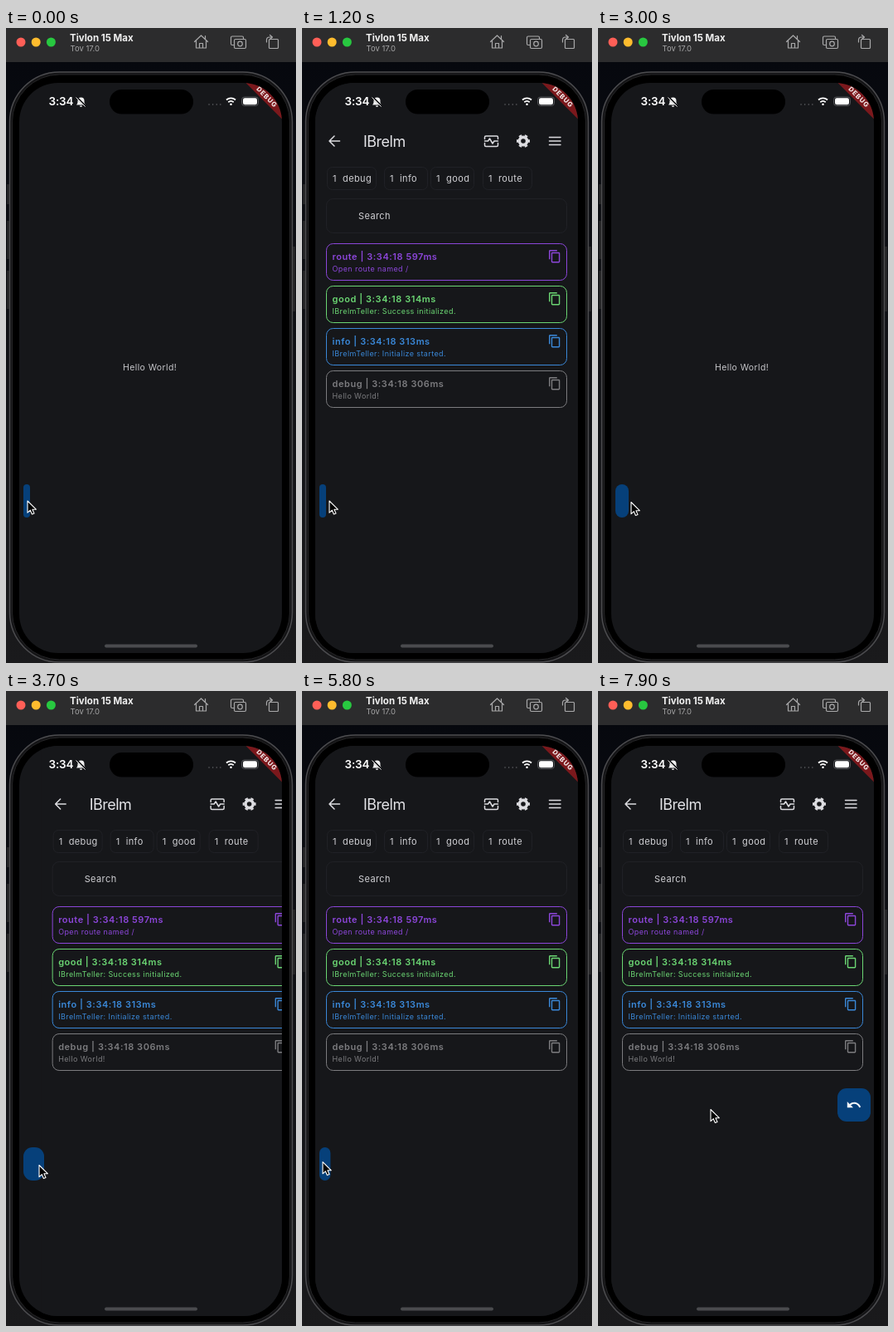
Animation of 350 by 764 pixels, one loop 8 s. Source, as an HTML page:

```html
<!DOCTYPE html>
<html lang="en">
<head>
<meta charset="utf-8">
<title>Log viewer demo</title>
<style>
  html, body { margin: 0; width: 100%; height: 100%; overflow: hidden; background: #08090c; }
  svg { display: block; width: 350px; height: 764px; font-family: Inter, "Open Sans", sans-serif; }
  text { white-space: pre; }
  .line { fill: none; stroke-linecap: round; stroke-linejoin: round; }
  .body { font-size: 11px; letter-spacing: .4px; fill: #d0d0d4; }
  .head { font-size: 11px; font-weight: 600; letter-spacing: .55px; }
  .sub { font-size: 9px; letter-spacing: .4px; }
  .faint { fill: none; stroke: #202126; }
</style>
</head>
<body>
<svg viewBox="0 0 350 764">
  <defs>
    <clipPath id="screen"><rect x="16" y="66" width="317" height="686" rx="47"/></clipPath>
    <linearGradient id="desk" x2="0" y2="1"><stop stop-color="#05070d"/><stop offset="1" stop-color="#1a1a1c"/></linearGradient>
    <path id="copy" transform="translate(296.6 6.8) scale(.7)" d="M16 1H4c-1.1 0-2 .9-2 2v14h2V3h12V1zm3 4H8c-1.1 0-2 .9-2 2v14c0 1.1.9 2 2 2h11c1.1 0 2-.9 2-2V7c0-1.1-.9-2-2-2zm0 16H8V7h11v14z"/>
  </defs>

  <!-- window bar -->
  <rect width="350" height="764" fill="url(#desk)"/>
  <rect width="350" height="41" fill="#2c2c2d"/>
  <g id="lights"></g>
  <text x="77" y="15.5" font-size="11.5" font-weight="700" fill="#f2f2f2">Tivlon 15 Max</text>
  <text x="77.5" y="28" font-size="9.5" fill="#a5a5a6">Tov 17.0</text>
  <g class="line" stroke="#a9a9aa" stroke-width="1.2">
    <path d="M227.5 16.5 235.5 9l8 7.500M229.5 15.5v8.5h12v-8.5M233.5 24v-5.5h4V24M240.5 13V9.5"/>
    <path d="M274.5 20.5H273a1.5 1.5 0 0 1-1.5-1.5v-7.5A1.5 1.5 0 0 1 273 10h12a1.5 1.5 0 0 1 1.5 1.5v1"/>
    <rect x="275.5" y="13.5" width="14" height="11" rx="1.5"/>
    <circle cx="282.5" cy="19" r="2.8"/>
    <rect x="317.5" y="13.5" width="11" height="11" rx="1"/>
    <path d="M314.5 17v-2.500a3.500 3.500 0 0 1 3.500-3.500h3M318.500 8.500l3 2.500-3 2.500"/>
  </g>

  <!-- device body -->
  <path d="M3 188v24M3 232v46M3 292v46M347 263v78" stroke="#242426" stroke-width="4"/>
  <rect x="4.5" y="53" width="341" height="710" rx="60" fill="#141416" stroke="#4c4c4f" stroke-width="1.5"/>
  <rect x="7.5" y="56" width="335" height="704" rx="57" fill="#000" stroke="#252527"/>

  <g clip-path="url(#screen)">
    <rect x="16" y="66" width="317" height="686" fill="#16171a"/>
    <text id="home" x="141" y="412" font-size="10.5" letter-spacing=".4" fill="#c6c6ca">Hello World!</text>

    <g id="page">
      <rect x="16" y="66" width="317" height="686" fill="#16171a"/>
      <g class="line" stroke="#dcdce0" stroke-width="1.5">
        <path d="M45.5 136H33.5M39 130l-6 6 6 6"/>
        <path d="M298.5 131.5h13.500M298.5 136h13.500M298.5 140.500h13.500"/>
        <path d="M220.5 133.5v-2a1.5 1.5 0 0 1 1.5-1.5h13a1.5 1.5 0 0 1 1.5 1.5v2M220.5 138.500v2.500A1.500 1.500 0 0 0 222 142.500h13a1.500 1.500 0 0 0 1.500-1.500v-2.500M220.500 136h4l2-3 3.500 6 2-3h4.500"/>
      </g>
      <g fill="none" stroke="#dcdce0">
        <circle cx="267" cy="136" r="4.6" stroke-width="3.6"/>
        <circle cx="267" cy="136" r="7" stroke-width="2" pathLength="12" stroke-dasharray="1 1" stroke-dashoffset=".5"/>
      </g>
      <text x="74" y="143" font-size="18" letter-spacing="-.5" fill="#e4e4e8">IBrelm</text>
      <g id="chips" class="body"></g>
      <rect class="faint" x="29.5" y="205.5" width="290" height="41" rx="8"/>
      <text class="body" x="68" y="229.5">Search</text>
      <g id="cards"></g>
    </g>

    <g id="button">
      <rect id="pill" x="21" y="549" height="40" fill="#06407a"/>
      <path id="undo" fill="#f4f6fa" transform="translate(31.2 559.4) scale(.8)" d="M12.5 8c-2.65 0-5.05.99-6.9 2.6L2 7v9h9l-3.62-3.62c1.39-1.16 3.16-1.88 5.12-1.88 3.54 0 6.55 2.31 7.6 5.5l2.37-.78C21.08 11.03 17.15 8 12.5 8z"/>
    </g>

    <!-- system overlay -->
    <g transform="translate(315 83) rotate(45)">
      <rect x="-40" y="-6" width="80" height="12" fill="#7b181c"/>
      <text y="2.9" font-size="8" font-weight="800" letter-spacing=".8" text-anchor="middle" fill="#f0e4e4">DEBUG</text>
    </g>
    <rect x="119" y="741.5" width="112" height="4" rx="2" fill="#4a4b4e"/>
  </g>
  <rect x="125" y="74" width="101" height="29.5" rx="14.7"/>
  <text x="51.5" y="93" font-size="13.5" font-weight="600" letter-spacing="-.2" fill="#fff">3:34</text>
  <path fill="#f0f0f0" d="M85 92.5c1.5-1.5 1.5-3 1.5-5a4 4 0 0 1 8 0c0 2 0 3.5 1.5 5zM89 93.5h3a1.5 1.5 0 0 1-3 0z"/>
  <path class="line" d="M85.5 83.5l10.5 10.5" stroke="#16171a" stroke-width="2.4"/>
  <path class="line" d="M84.8 83.8l10.5 10.5" stroke="#f0f0f0"/>
  <path class="line" d="M245 92h16" stroke="#66676b" stroke-width="1.4" stroke-dasharray=".1 4.5"/>
  <g class="line" stroke="#fff" stroke-width="1.9">
    <path d="M266 86.5a8.2 8.2 0 0 1 11 0M268.3 89.2a5 5 0 0 1 6.4 0" stroke-linecap="butt"/>
    <path d="M271.5 91.8v.1" stroke-width="2.4"/>
  </g>
  <rect x="284.5" y="83" width="20" height="10.5" rx="3.3" fill="none" stroke="#55565a"/>
  <rect x="286" y="84.3" width="17" height="8" rx="2.2" fill="#fff"/>

  <path id="cursor" d="M0 0V14.2L3.3 11.2 5.4 16 8 14.9 5.9 10.2H10.3Z" fill="#000" stroke="#fff" stroke-width="1.1" stroke-linejoin="round"/>
</svg>

<script>
const $ = id => document.getElementById(id);
const fill = (id, items, markup) => $(id).innerHTML = items.map(markup).join("");

fill("lights", ["#ff5f57", "#febc2e", "#28c840"], (color, i) =>
  `<circle cx="${18 + i * 18.2}" cy="17" r="5.5" fill="${color}"/>`);

fill("chips", [["debug", 37], ["info", 106], ["good", 162], ["route", 225]], ([name, x]) =>
  `<rect class="faint" x="${x - 6.5}" y="167.5" width="${24 + name.length * 7}" height="27" rx="6"/>
   <text x="${x}" y="185">1</text><text x="${x + 12}" y="185">${name}</text>`);

fill("cards", [
  ["route | 3:34:18 597ms", "Open route named /", "#8c46da"],
  ["good | 3:34:18 314ms", "IBrelmTeller: Success initialized.", "#6bd673"],
  ["info | 3:34:18 313ms", "IBrelmTeller: Initialize started.", "#3a88d8"],
  ["debug | 3:34:18 306ms", "Hello World!", "#7c7c7f"],
], ([head, sub, color], i) => `<g transform="translate(0 ${259.5 + i * 51})" fill="${color}">
    <rect x="29.5" width="290" height="44" rx="8" fill="none" stroke="${color}"/>
    <text class="head" x="36.5" y="19">${head}</text>
    <text class="sub" x="36.5" y="33.5">${sub}</text>
    <use href="#copy"/></g>`);

const ramp = (t, start, length) => Math.min(1, Math.max(0, (t - start) / length));
const easeOut = f => 1 - (1 - f) ** 3;
const smooth = f => f * f * (3 - 2 * f);

// Goes from 0 to 1 and back, switching at each of the given times.
const toggle = (t, times, length, ease) =>
  times.reduce((sum, start, i) => sum + (i % 2 ? -1 : 1) * ease(ramp(t, start, length)), 0);

const pageTaps = [600, 2500, 3420];
const pillTaps = [100, 600, 1700, 2500, 2950, 3420, 5700];
const dragStart = 6430, dragLength = 470, dragX = 268, dragY = -71;

// Pointer moves: start, length, destination.
const moves = [
  [150, 300, 38, 570], [900, 300, 33, 569], [1700, 400, 40, 570.5], [4100, 600, 22, 567], [5700, 600, 62, 561.5],
  [dragStart, dragLength, 62 + dragX, 561.5 + dragY], [7150, 250, 216, 500], [7550, 340, 136, 503.5],
];
const pointer = t => moves.reduce(([x, y], [start, length, toX, toY]) => {
  const f = smooth(ramp(t, start, length));
  return [x + (toX - x) * f, y + (toY - y) * f];
}, [26, 569]);

const place = (id, x, y) => $(id).setAttribute("transform", `translate(${x} ${y})`);

function draw(now) {
  const t = now % 8000;
  const shown = toggle(t, pageTaps, 500, easeOut);
  const width = 8 + 32 * toggle(t, pillTaps, 600, f => f);
  const drag = smooth(ramp(t, dragStart, dragLength));
  place("home", -105 * shown, 0);
  place("page", 317 * (1 - shown), 0);
  place("button", dragX * drag, dragY * drag);
  place("cursor", ...pointer(t));
  $("pill").setAttribute("width", width);
  $("pill").setAttribute("rx", Math.min(11, width / 2));
  $("undo").setAttribute("opacity", Math.max(0, (width - 30) / 10));
  requestAnimationFrame(draw);
}
draw(0);
</script>
</body>
</html>
```
